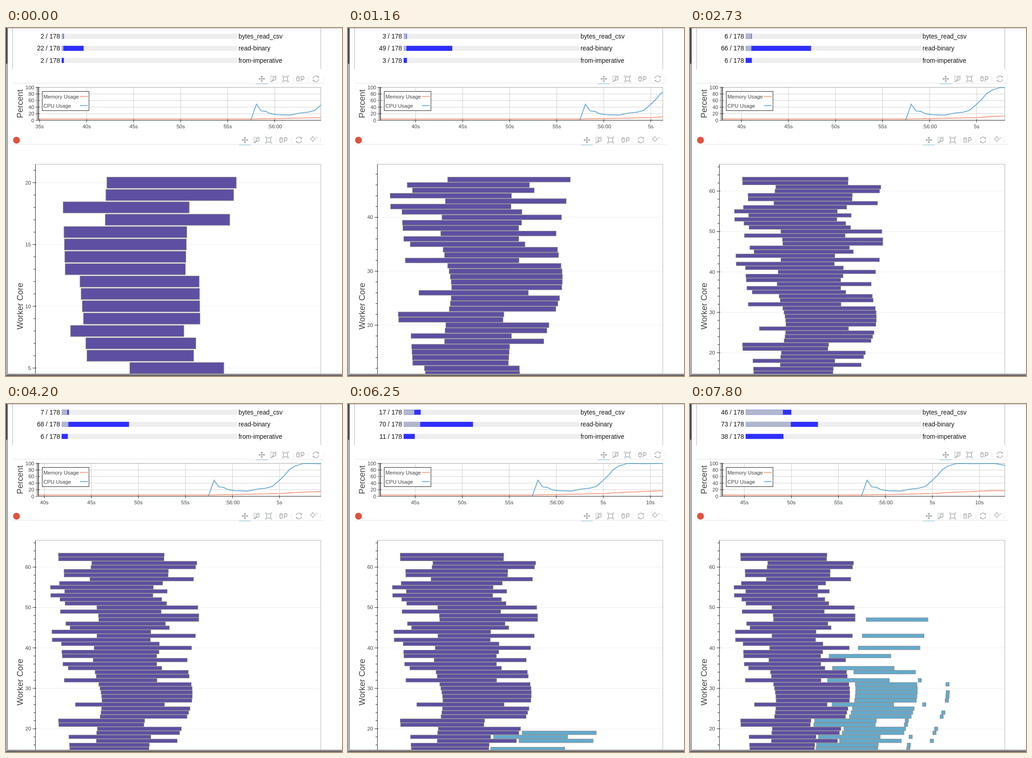
An HTML page for the animation above (8000 ms loop, 737 px wide and 760 px high).

```html
<!DOCTYPE html>
<html lang="en">
<head>
<meta charset="utf-8">
<title>Worker dashboard</title>
<style>
html, body { margin: 0; width: 100%; height: 100%; overflow: hidden; background: #fff; }
svg { display: block; font-family: "Liberation Sans", Arial, sans-serif; }
.task { font-size: 13.8px; fill: #111; }
.count { font-size: 14px; fill: #111; }
.tick { font-size: 11.5px; fill: #444; }
.title { font-size: 18.1px; fill: #444; }
.icon { fill: none; stroke: #a1a6a9; stroke-width: 1.4; }
</style>
</head>
<body>
<svg id="stage" width="737" height="760" viewBox="0 0 737 760">
  <defs>
    <clipPath id="barClip"><rect x="64" y="298" width="627" height="457"/></clipPath>
    <clipPath id="lineClip"><rect x="71" y="128" width="620" height="74"/></clipPath>
    <g id="pan" class="icon"><path d="M-6 0H6M0-6V6M-4-2L-6.3 0L-4 2M4-2L6.3 0L4 2M-2-4L0-6.3L2-4M-2 4L0 6.3L2 4"/></g>
    <g id="zoomBox" class="icon"><path d="M-6 6V-6H6V-3M-6 6H-3" stroke-dasharray="2 1.4"/><circle cx="2" cy="-.5" r="3.4"/><path d="M-.5 2L-4 6" stroke-width="2"/></g>
    <g id="fit" class="icon"><rect x="-4.5" y="-4.5" width="9" height="9"/><path d="M-7-4V-7H-4M4-7H7V-4M7 4V7H4M-4 7H-7V4" stroke-width="1"/></g>
    <g id="wheel" class="icon"><rect x="-8" y="-5" width="6" height="10" rx="3"/><path d="M-5-3V0M3 1L1 6"/><circle cx="5" cy="-2" r="3.2"/></g>
    <g id="reset" class="icon"><path d="M-6.2-1A6.2 6.2 0 0 1 5.2-3.4M6.2 1A6.2 6.2 0 0 1-5.2 3.4"/><path d="M6.5-6V-2.5H3ZM-6.5 6V2.5H-3Z" fill="#a1a6a9" stroke="none"/></g>
    <g id="hover" class="icon"><path d="M0-8.5V-4M0 0V4.5M-6.5-2H-2M2-2H6.5M7-5.5L9-3.8L11-5.5" stroke-width="1"/><circle cy="-2" r="4.3" stroke-width="1"/></g>
  </defs>
</svg>
<script>
const LOOP = 8000;
const stage = document.getElementById("stage");

function add(tag, attrs, parent = stage, text) {
  const el = document.createElementNS("http://www.w3.org/2000/svg", tag);
  set(el, attrs);
  if (text) el.textContent = text;
  parent.appendChild(el);
  return el;
}
function set(el, attrs) {
  for (const k in attrs) el.setAttribute(k, attrs[k]);
}
const line = (d, stroke, width = 1, parent = stage) =>
  add("path", { d, stroke, "stroke-width": width, fill: "none" }, parent);
const box = (x, y, width, height, fill) => add("rect", { x, y, width, height, fill });
const label = (x, y, cls, anchor, text) =>
  add("text", { x, y, class: cls, "text-anchor": anchor }, stage, text);
const title = (y, text) =>
  add("text", { class: "title", "text-anchor": "middle", transform: `translate(37 ${y}) rotate(-90)` }, stage, text);
const range = (a, b) => Array.from({ length: b - a + 1 }, (_, i) => a + i);

// Linear interpolation in rows of [position, value...]
function at(keys, t, col = 1) {
  let i = keys.length - 1;
  while (i > 0 && keys[i][0] > t) i--;
  const a = keys[i], b = keys[i + 1];
  return b ? a[col] + (b[col] - a[col]) * (t - a[0]) / (b[0] - a[0]) : a[col];
}
const count = (keys, t, col) => Math.floor(at(keys, t, col) + 0.001);

// Window edges
box(0, 0, 3, 78, "#484848");
box(0, 78, 3, 682, "#b4b4b4");
box(3, 0, 1, 758, "#8a8a8a");
box(3, 755, 734, 3, "#949494");
box(0, 758, 737, 2, "#62585c");

// Task progress, [time, tasks]
line("M4 .5H737M14.5 0V90M690.5 0V90", "#b5b5b5");
const parsed = [[0, 2], [850, 3], [1700, 3], [2510, 6], [4150, 7], [5990, 12], [6200, 17], [7750, 46]];
const read = [[0, 22], [558, 34], [1550, 61], [2130, 66], [4000, 68], [5990, 70], [7750, 73]];
const built = [[0, 2], [850, 3], [1700, 3], [2560, 6], [4200, 6], [5990, 10], [6200, 11], [7750, 38]];
const rows = ["bytes_read_csv", "read-binary", "from-imperative"].map((name, i) => {
  const y = 12.5 + i * 26.4;
  box(122, y, 385, 11, "#eee");
  label(510, y + 10.3, "task", "start", name);
  return {
    text: label(118.5, y + 10.3, "count", "end", ""),
    all: box(122, y, 0, 11, "#2f2fff"),
    freed: box(122, y, 0, 11, "#b0b7cd")
  };
});
function drawRow(row, all, freed) {
  row.text.textContent = all + " / 178";
  row.all.setAttribute("width", all * 2.163 + 0.7);
  row.freed.setAttribute("width", freed ? freed * 2.163 - 0.4 : 0);
}

// Toolbars
function toolbar(x, y, icons, breaks) {
  for (const [name, dx] of Object.entries(icons))
    add("use", { href: "#" + name, transform: `translate(${x + dx} ${y})` });
  for (const dx of breaks) line(`M${x + dx + .5} ${y - 5}V${y + 6}`, "#e6e6e6");
  line(`M14 ${y + 9.5}H698`, "#e4e4e4");
  line(`M${x - 13} ${y + 11}H${x + 13}`, "#b3d5e2", 1.6);
}
const tools = { pan: 0, zoomBox: 26, fit: 52, wheel: 84.5, reset: 118.5 };
toolbar(561, 111, tools, [69, 101, 135]);
toolbar(524, 244.5, { ...tools, hover: 149 }, [69, 101, 133, 165]);
add("circle", { cx: 23, cy: 245, r: 7.5, fill: "#e0533d" });

// Usage chart; curves are [seconds after the CPU peak, percent]
const PX_S = 20.63, PEAK_X = 549.2, MEM = "#fa9577", CPU = "#5fa6cc";
const pctY = p => 201.5 - p * 0.717;
const memory = [[-30, 4], [-.6, 4], [2.5, 5.5], [7, 8.3], [9, 12], [11.3, 14.6], [13.1, 17], [16, 16.8]];
const cpu = [[-.6, 0], [0, 49], [.5, 28.5], [1, 27], [1.5, 20], [2.2, 17], [3.6, 16], [4.6, 22], [5.5, 24.5],
  [6.2, 30], [7, 50], [7.5, 64], [8, 81], [8.6, 92], [9.4, 99], [10, 100], [11, 99], [13.6, 100], [15, 92]];
const curve = keys => "M" + keys.map(([s, p]) => [PEAK_X + s * PX_S, pctY(p)]).join("L");

const pcts = range(0, 5).map(i => i * 20);
line(pcts.map(p => `M71 ${pctY(p)}H691`).join(""), "#d2d2d2");
for (const p of pcts) label(62, pctY(p) + 4, "tick", "end", String(p));
const secGrid = line("", "#cfcfcf");
line("M71 129.5H690.5V201.5", "#b0b0b0");
const lines = add("g", {}, add("g", { "clip-path": "url(#lineClip)" }));
line(curve(memory), MEM, 1.7, lines);
line(curve(cpu), CPU, 1.7, lines);
line("M71.5 129V202M71 201.5H691" + pcts.map(p => `M65 ${pctY(p)}H73.5`).join("") +
  range(0, 25).map(i => `M67 ${pctY(i * 4)}H71`).join(""), "#222");
const secTicks = line("", "#222");
const secLabels = ["35s", "40s", "45s", "50s", "55s", ":56:00", "5s", "10s"]
  .map(s => label(0, 218.5, "tick", "middle", s));
add("rect", { x: 79.5, y: 138.5, width: 102.5, height: 42, fill: "#fff", stroke: "#222" });
label(82, 153.5, "tick", "start", "Memory Usage");
label(82, 173.5, "tick", "start", "CPU Usage");
line("M162 149.5H179.5", MEM, 1.7);
line("M162 169.5H179.5", CPU, 1.7);
title(165.5, "Percent");

// [samples taken, seconds scrolled]
const scrolled = [[0, 0], [1, .52], [3, 1.38], [6, 3.1], [9, 4.5], [13, 6.43], [16, 7.8]];
function drawUsage(t) {
  const shift = at(scrolled, Math.floor((t + 370) / 490)) * PX_S;
  lines.setAttribute("transform", `translate(${-shift} 0)`);
  let grid = "", ticks = "";
  secLabels.forEach((el, i) => {
    const x = 73.8 + i * 5 * PX_S - shift, on = x > 70.5 && x < 691;
    set(el, { x, visibility: on ? "visible" : "hidden" });
    if (!on) return;
    grid += `M${x} 130V201`;
    ticks += `M${x} 199.5V206`;
  });
  secGrid.setAttribute("d", grid);
  secTicks.setAttribute("d", ticks);
}

// Worker chart: each core reads, some then parse and build
const PURPLE = "#5e4fa2", BLUE = "#63aacd";
const span = [[5, 134], [6, 152], [9, 166], [16, 175], [22, 189], [30, 202], [38, 207], [39, 213], [63, 232]];
const early = [[5, 233], [6, 172], [12, 162], [13, 141], [18, 138], [40, 122], [63, 115]];
const late = [17, 19, 20, ...range(23, 25), ...range(27, 31), 33, 34, 37, 40, 43, 47, 48, 50, 57, 60, 61];
const waves = [[-20, 8, 21, 22, 42, 44, 53, 55], [11, 35, 46, 51, 54, 58, 59], [20, 26, 45]];
function readStart(core) {
  if (late.includes(core)) return 205 - 0.35 * (core - 20) + 8 * Math.cos((core - 27) * Math.PI / 10);
  const wave = waves.find(w => w.indexOf(core) > 0);
  return at(early, core) + (wave ? wave[0] : 0);
}
const readEnd = core => readStart(core) + at(span, core);
const parseStart = core => readEnd(core) + 5 + 0.8 * (core - 16);
const PARSE = 166, BUILD_GAP = 77.5, BUILD = 9;
const parseOrder = [15, 17, 18, 19, 16, ...range(20, 32), 34, 35, 38, 40, 43, 47];
const buildOrder = [...range(15, 24), ...range(26, 29), 31, 32];
const bars = [
  ...range(5, 63).map(core => ({ core, l: readStart(core), w: at(span, core), born: 0, fill: PURPLE })),
  ...parseOrder.map((core, i) => ({ core, l: parseStart(core), w: PARSE, born: 6010 + i * 60, fill: BLUE })),
  ...buildOrder.map((core, i) => ({
    core, l: parseStart(core) + PARSE + BUILD_GAP, w: BUILD, born: 6900 + i * 52, fill: BLUE
  }))
];

const coreGrid = line("", "#eee");
line("M64 297.5H690.5V755", "#b3b3b3");
const barLayer = add("g", { "clip-path": "url(#barClip)", stroke: "#8c8c8c" });
for (const b of bars) b.el = add("rect", { fill: b.fill }, barLayer);
line("M64.5 298V755", "#222");
const coreTicks = line("", "#222");
const coreLabels = range(1, 10).map(() => label(55, 0, "tick", "end", ""));
title(607.5, "Worker Core");

// [time, left bound, right bound, cores]
const view = [[0, 98.2, 505.4, 21], [558, 88.2, 515.5, 34], [1550, 69, 645.8, 60], [1950, 65, 680, 64],
  [2210, 64, 691, 64], [5990, 64, 691, 64], [6200, 63.4, 703.9, 64], [7650, 57.5, 825.9, 64]];

function drawBars(t) {
  const left = at(view, t, 1), right = at(view, t, 2), n = count(view, t, 3);
  const rangeY = 1.1 * (n - 0.1), unit = 620.5 / rangeY, scale = 627 / (right - left);
  const py = k => 325.7 + (n - 0.55 - k) * unit;
  for (const b of bars) {
    const on = b.core < n && t >= b.born;
    set(b.el, {
      x: 64 + (b.l - left) * scale, y: py(b.core + 0.45),
      width: b.w * scale, height: unit * 0.9,
      visibility: on ? "visible" : "hidden"
    });
  }
  const major = rangeY > 40 ? 10 : 5;
  let grid = "", ticks = "", used = 0;
  for (let k = 0; k < rangeY; k += major / 5) {
    const y = py(k);
    if (y < 298 || y > 754) continue;
    if (k % major) { ticks += `M60.5 ${y}H64`; continue; }
    ticks += `M58.5 ${y}H66.5`;
    grid += `M65 ${y}H690`;
    const el = coreLabels[used++];
    el.setAttribute("y", y + 4);
    el.textContent = k;
  }
  for (; used < coreLabels.length; used++) coreLabels[used].textContent = "";
  coreGrid.setAttribute("d", grid);
  coreTicks.setAttribute("d", ticks);
}

function draw(ms) {
  const t = ms % LOOP;
  const step = t < 1690 || t >= 5990 ? 62 : 130;
  const q = Math.floor(t / step) * step;
  const done = count(parsed, q), last = count(built, q);
  drawRow(rows[0], done, last);
  drawRow(rows[1], count(read, q), done);
  drawRow(rows[2], last, 0);
  drawUsage(t);
  drawBars(q);
}

let begin;
function loop(now) {
  if (begin === undefined) begin = now;
  draw(now - begin);
  requestAnimationFrame(loop);
}
draw(0);
requestAnimationFrame(loop);
</script>
</body>
</html>
```
